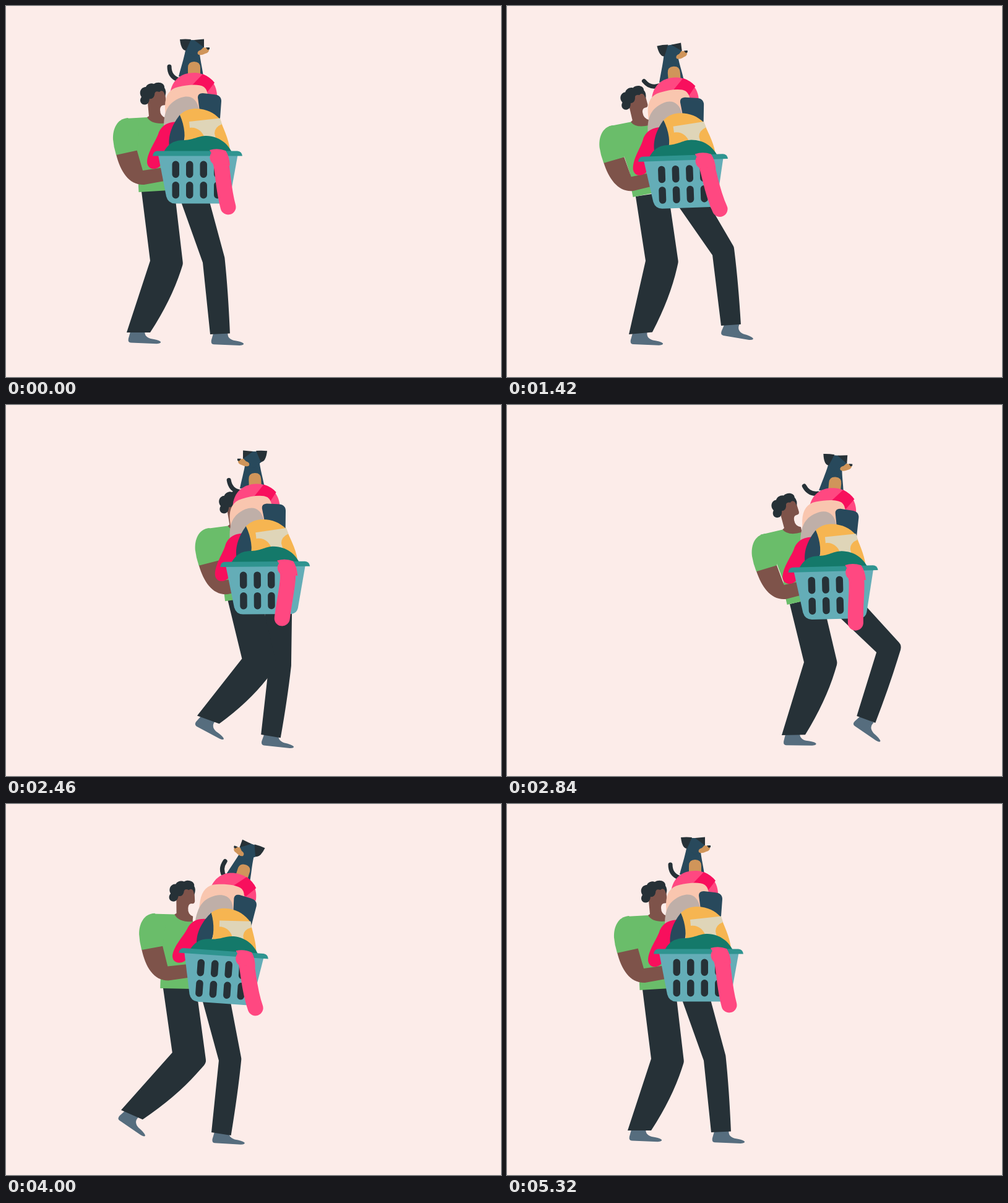
An HTML page with a canvas that plays this animation: 800 px wide and 600 px high, repeating every 5500 ms.

```html
<!DOCTYPE html>
<html>
<head>
<meta charset="utf-8">
<style>
html, body { margin: 0; width: 100%; height: 100%; overflow: hidden; background: #fcece9; }
canvas { display: block; }
</style>
</head>
<body>
<canvas id="stage" width="800" height="600"></canvas>
<script>
const ctx = document.getElementById('stage').getContext('2d');
const LOOP = 5500;
const DARK = '#263137', SKIN = '#7e534a', SHIRT = '#6abd6a', NAVY = '#28495c',
  PINK = '#ff4881', RED = '#f80f5d', TAN = '#d0955a', FOOT = '#566d7e';

// Each row: time, then the animated values.
// x, y, lean
const body = [
  [900, 215, 300, 0], [1265, 211, 299, -3], [1420, 204, 308, -8], [1830, 181, 318, -21],
  [2140, 207.5, 324, -13], [2400, 330, 316, -4], [2640, 415, 318, -7], [2840, 453, 322, -9.8],
  [3180, 441, 319, -15], [3400, 445, 320, -14], [3780, 330, 305, 0], [4000, 250, 297, 4.6],
  [4300, 212, 299, -1], [4620, 215, 300, 0]
];
// x, y, basket tilt, pile tilt, sock swing
const load = [
  [900, 310, 238, 0, 0, 0], [1265, 306, 231, -1, 1, 3], [1420, 285, 245, -2, -3.7, -6.5],
  [1830, 252, 258, -8, -10, 4], [2140, 281.5, 260, -6, 4.7, 13], [2400, 394, 256, 0, -4, 14],
  [2640, 485, 262, -3, -6, 10], [2840, 527.5, 264.5, -1.5, 3.5, 8], [3180, 514, 262, -2, -7, -6],
  [3400, 516.5, 263, -0.8, -8.9, 16], [3780, 425, 248, 3, 6, -14], [4000, 352.5, 241, 4, 13, -1],
  [4300, 306, 236, -1, -3, 10], [4640, 310, 238, 0, 1, -3], [4900, 310, 238, 0, -0.5, 1],
  [5180, 310, 238, 0, 0, 0]
];
// x, y, tilt, head tilt, tail
const dog = [
  [900, 0, 0, 0, 0, 0], [1265, 0, -9, 0, -3, -10], [1420, 0, 0, -5, -7, -39],
  [1830, -4, 2, -14, -10, -20], [2140, 6, 3, 13, 17, 0], [2500, 0, 0, -3, 0, -10],
  [2840, 0, 0, 5.5, 4, -28], [3180, -5, 4, -8, -8, -20], [3400, -8, 7, -16, -18, 0],
  [3780, 0, 0, 8, 10, 20], [4000, 6, 2, 18, 20, 35], [4350, 0, -5, -3, -3, 0],
  [4640, 0, 0, 1, 2, -6], [5000, 0, 0, 0, -1, 4], [5320, 0, 0, 0, 0, 0]
];
// side the dog looks to
const turn = [
  [1880, 1], [1980, -1], [2500, -1], [2600, 1], [3650, 1], [3750, -1], [4300, -1], [4400, 1]
];
// knee x, y, hem x, y, foot angle
const leftLeg = [
  [900, 233, 412, 195, 528, 1], [1420, 224, 412, 197, 531, 1], [1830, 215, 412, 195, 532, 3],
  [2140, 227, 413, 195, 532, 4], [2400, 349, 410, 268, 497, 32], [2640, 462, 412, 440, 532, 0],
  [2840, 480, 416, 444, 534, -1], [3400, 480, 416, 444, 534, 2], [3620, 452, 412, 440, 531, 4],
  [3780, 385, 405, 375, 510, 15], [4000, 269, 402, 186, 495, 33], [4250, 232, 410, 193, 527, 3],
  [4620, 233, 412, 195, 528, 1]
];
const rightLeg = [
  [1100, 318, 415, 330, 531, 1], [1420, 332, 403, 346, 517, 8], [1830, 362, 376, 352, 492, 10],
  [2140, 357, 391, 355, 501, 10], [2390, 405, 422, 411, 534, 2], [2500, 438, 420, 413, 532, 8],
  [2640, 500, 415, 445, 505, 35], [2840, 597, 400, 565, 503, 33], [3180, 625, 366, 625, 470, 12],
  [3400, 616, 375, 612, 482, 17], [3780, 362, 414, 335, 530, 2], [4000, 344, 415, 332, 531, 2],
  [4620, 318, 415, 330, 531, 1]
];

const rad = d => d * Math.PI / 180;
const mix = (a, b, k) => a + (b - a) * k;

// Smooth interpolation that never overshoots its keys.
function slope(keys, i, c) {
  if (i < 1 || i > keys.length - 2) return 0;
  const rate = j => (keys[j][c] - keys[j - 1][c]) / (keys[j][0] - keys[j - 1][0]);
  const a = rate(i), b = rate(i + 1);
  return a * b > 0 ? 2 * a * b / (a + b) : 0;
}
function sample(keys, t) {
  const i = keys.findIndex(k => k[0] > t);
  if (i < 1) return keys.at(i).slice(1);
  const p = keys[i - 1], q = keys[i], span = q[0] - p[0], u = (t - p[0]) / span;
  return p.slice(1).map((v, n) => {
    const c = n + 1, s = u * u * (3 - 2 * u);
    return mix(v, q[c], s) + span * u * (1 - u) *
      ((1 - u) * slope(keys, i - 1, c) - u * slope(keys, i, c));
  });
}

function fill(color, path) {
  ctx.fillStyle = color;
  ctx.fill(new Path2D(path));
}
function line(color, width, path, cap = 'round') {
  ctx.strokeStyle = color;
  ctx.lineWidth = width;
  ctx.lineCap = cap;
  ctx.stroke(new Path2D(path));
}
// Draws with the point (px, py) moved to (x, y) and turned around it.
function group(x, y, angle, px, py, draw, flip = 1) {
  ctx.save();
  ctx.translate(x, y);
  ctx.rotate(rad(angle));
  ctx.scale(flip, 1);
  ctx.translate(-px, -py);
  draw();
  ctx.restore();
}
function turned(x, y, angle) {
  const c = Math.cos(rad(angle)), s = Math.sin(rad(angle));
  return [x * c - y * s, x * s + y * c];
}

function drawLeg(hx, hy, [kx, ky, ex, ey, foot], { top, knee, hem, cut, ankle }) {
  const a = Math.atan2(ky - hy, kx - hx), b = Math.atan2(ey - ky, ex - kx);
  const ax = Math.sin(a), ay = -Math.cos(a), bx = Math.sin(b), by = -Math.cos(b);
  const miter = knee / (1 + Math.cos(a - b));
  const fx = kx + bx * knee, fy = ky + by * knee;
  const h = b - Math.PI / 2 + rad(cut), cx = Math.cos(h), cy = Math.sin(h);
  group(ex + cx * ankle, ey + cy * ankle, foot, 0, 0, () =>
    fill(FOOT, 'M1-5L-3 10Q-4 16 1 16.5L43 17.5Q51 17 49 14Q45 11 33 9.500Q21 6 24-5Z'));
  ctx.fillStyle = DARK;
  ctx.beginPath();
  ctx.moveTo(hx, hy);
  ctx.lineTo(hx + ax * top, hy + ay * top);
  ctx.arcTo(kx + (ax + bx) * miter, ky + (ay + by) * miter, fx, fy, 12);
  ctx.lineTo(fx, fy);
  ctx.quadraticCurveTo(fx + Math.cos(b) * 50, fy + Math.sin(b) * 50, ex + cx * hem, ey + cy * hem);
  ctx.lineTo(ex, ey);
  ctx.lineTo(kx, ky);
  ctx.fill();
}

function drawTorso() {
  fill(SHIRT, 'M192 182L228 180L257 186L264 200V298L214.500 301Q213 280 215 262L208 225Z');
  fill(SKIN, 'M236 134L229 156L231 178L228 180Q235 192 258 189.500L258 181Q249 178 249 168' +
    'Q249 161 254 160.500Q259 161 259 156L258 148L256 134Z');
  fill(DARK, 'M225 159.500C217 160 215 152 219 147C214 140 218 131 226 131C228 126 235 124 239 126' +
    'C246 121 257 125 256 132Q260 138 257 146C256 138 252 135 248 139Q240 136 240 144' +
    'Q238 151 232 150Q231 159 225 159.500Z');
}
function drawArm() {
  fill(SKIN, 'M178 240L211.500 233L221 266L256 261V283L223 289C199 290 185 268 178 240Z');
  fill(SHIRT, 'M197 181C179 182 172 200 173 216Q174 228 178 241L212 233.500L215 200Z');
}

function drawDog(tilt, headTilt, tail, side) {
  group(278, 119, tail - tilt, 278, 119, () => line(DARK, 7, 'M264 98Q264 114 278 119'));
  fill(NAVY, 'M279 114C284 95 289 80 291 66L312 66C313 85 317 98 319 114Z');
  fill(TAN, 'M294 114V100Q294 90 304 90Q314 90 314 100V114Z');
  group(303, 68, headTilt - tilt, 303, 68, () => {
    fill(NAVY, 'M290 72L295 55H308L320 66L313 77L303 82Z');
    fill(DARK, 'M281 54Q290 53 299 54L291 72Q283 72 281 54Z');
    fill(DARK, 'M304 55L320 53.500V67Z');
    fill(TAN, 'M319 67L328 68Q329 76 322 77Q314 81 310 78Q308 73 315 71Z');
    fill(DARK, 'M323 67H329V70L326 71Z');
  }, side);
}

function drawPile(basket, pile, pup, side) {
  const layer = (weight, draw) =>
    group(310, 238, mix(basket, pile, weight) - basket, 310, 238, draw);
  const [dx, dy, tilt, headTilt, tail] = pup;
  const [bx, by] = turned(-10, -129, pile);
  const [x, y] = turned(bx + dx, by + dy, -basket);
  group(310 + x, 238 + y, tilt - basket, 300, 109, () => drawDog(tilt, headTilt, tail, side));
  layer(1, () => {
    fill(PINK, 'M265 142C268 118 285 107 306 108C326 109 340 124 341 144L325 155H270Z');
    fill(RED, 'M318 110Q330 115 337 124L324 141L300 129Z');
  });
  layer(0.7, () => {
    fill('#f9c6af', 'M257 162C257 145 264 134 278 131C295 127 312 126 320 131Q326 136 326 146L312 190H258Z');
    fill(NAVY, 'M310 148Q310 141 318 141L336 143Q348 144 348 154L345 195L315 185Z');
    fill('#bfafa8', 'M255 195C255 170 262 156 283 148C298 143 309 150 312 168L300 200Z');
  });
  layer(0.4, () => {
    fill(RED, 'M280 187C262 187 253 192 247 204C243 218 228 236 228 253C229 264 240 266 248 260' +
      'C256 252 262 240 270 232Z');
    fill(NAVY, 'M281 176C270 190 261 208 264 228L285 225C293 208 288 190 281 176Z');
    fill('#f6b551', 'M281 176C290 168 298 166 308 166C325 167 335 172 346 183C350 196 360 214 362 233' +
      'L286 230Q293 204 281 176Z');
    fill('#dfd5b8', 'M296 187L346 181.500L349 191Q337 196 337 206L340 218H322C320 203 308 195 297 197Z');
  });
  fill('#14796a', 'M254 238C262 222 272 217 288 217C305 216 310 210 324 210C345 211 358 222 366 238Z');
}

function drawBasket(swing) {
  fill('#64adb7', 'M246 241H374.500L362 310Q360 319 351 319.500H273Q262 319 259 308Z');
  ctx.fillStyle = DARK;
  ctx.beginPath();
  for (let i = 0; i < 8; i++)
    ctx.roundRect(268.5 + i % 4 * 22.5, i < 4 ? 250.5 : 284, 11.5, 27.5, 5.7);
  ctx.fill();
  fill('#2f9490', 'M237 242.500Q238 235 244 234.500H374Q381 235 382 242.500Z');
  const [cx, cy] = turned(6, 52, swing / 2), [ex, ey] = turned(17, 92, swing);
  line(PINK, 25, `M342 245C352 252 ${342 + cx} ${233 + cy} ${342 + ex} ${233 + ey}`);
  fill(PINK, 'M329 233Q342 229 355 234Q361 243 362 258L339 255Q335 242 329 233Z');
}

function draw(t) {
  ctx.fillStyle = '#fcece9';
  ctx.fillRect(0, 0, 800, 600);
  const [x, y, lean] = sample(body, t);
  drawLeg(x + 62, y, sample(rightLeg, t), { top: 46, knee: 36, hem: 32, cut: 3, ankle: 5 });
  drawLeg(x + 4, y, sample(leftLeg, t), { top: 53, knee: 52, hem: 38, cut: -18, ankle: 6 });
  group(x, y, lean, 215, 300, drawTorso);
  const [sx, sy] = turned(-23, -95, lean);
  group(x + sx, y + sy, lean * 0.45, 192, 205, drawArm);
  const [lx, ly, basket, pile, sock] = sample(load, t);
  group(lx, ly, basket, 310, 238, () => {
    drawPile(basket, pile, sample(dog, t), sample(turn, t)[0]);
    drawBasket(sock - basket);
  });
}

const start = performance.now();
function tick() {
  draw((performance.now() - start) % LOOP);
  requestAnimationFrame(tick);
}
tick();
</script>
</body>
</html>
```
